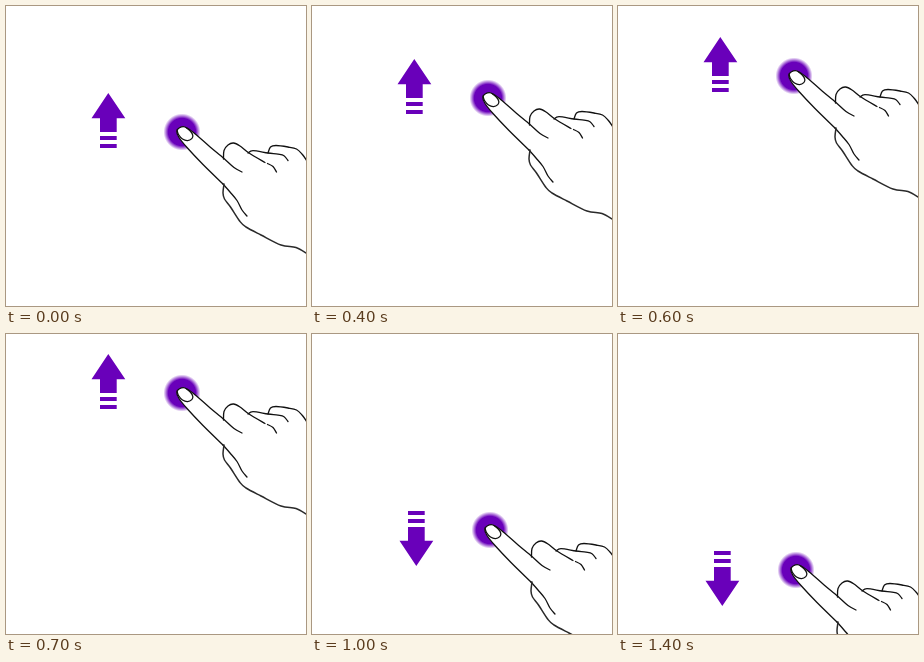
Recreate the animation shown at these times as an HTML page with a canvas. Size 300 by 300 pixels, loop 1.6 s.

```html
<!DOCTYPE html>
<html lang="en">
<head>
<meta charset="utf-8">
<title>Swipe up and down</title>
<style>
  html, body { margin: 0; width: 100%; height: 100%; overflow: hidden; background: #fff; }
  canvas { display: block; width: 300px; height: 300px; }
</style>
</head>
<body>
<canvas id="stage"></canvas>
<script>
const SIZE = 300, LOOP = 1600, STEP = 100;
const PURPLE = '#6900ba';
const canvas = document.getElementById('stage');
const ctx = canvas.getContext('2d');
const ratio = window.devicePixelRatio || 1;
canvas.width = canvas.height = SIZE * ratio;

// Smooth curve through every point (Catmull-Rom as Béziers).
function curve(...p) {
  const path = new Path2D();
  const at = i => p[Math.max(0, Math.min(p.length - 1, i))];
  path.moveTo(...p[0]);
  for (let i = 0; i < p.length - 1; i++) {
    const [a, b, c, d] = [at(i - 1), at(i), at(i + 1), at(i + 2)];
    path.bezierCurveTo(
      b[0] + (c[0] - a[0]) / 6, b[1] + (c[1] - a[1]) / 6,
      c[0] - (d[0] - b[0]) / 6, c[1] - (d[1] - b[1]) / 6, c[0], c[1]);
  }
  return path;
}

const finger = curve([217, 178], [197, 158.5], [181, 141.5], [173, 131.5], [170.8, 125.5],
  [173.5, 121.8], [179, 121], [187.5, 126.5], [203, 140], [218, 152.5], [228, 161.5], [236, 166]);
const nail = curve([171, 124], [172.5, 128.5], [176.5, 133], [181.5, 134.6], [185.8, 132.6],
  [186.8, 129.3], [184.5, 125.2], [180, 121.6]);
const lines = [
  curve([217, 178], [224, 186], [231, 194.5], [236, 204], [241, 210]),
  curve([217.5, 153], [218, 144.5], [222, 139], [227.5, 137], [234, 140], [243, 147], [259, 156.5]),
  curve([261.5, 157.5], [267, 160.5], [270.5, 166]),
  curve([242, 147], [247, 144.6], [262, 147], [272, 148.2], [278, 149.7], [282, 154.5]),
  curve([262, 147], [264.5, 141], [270, 139.5], [282, 141], [290.5, 143], [296, 148], [301, 155])
];
const palm = curve([218, 178], [217, 187], [218.5, 193], [224.5, 201], [234, 215.5], [240, 221],
  [255, 229], [275, 239], [290, 241.5], [301, 247.5]);

function drawArrow() {
  ctx.fillStyle = PURPLE;
  ctx.beginPath();
  [[102.3, 87], [119.3, 112.3], [110.7, 112.3], [110.7, 126], [94, 126], [94, 112.3], [85.5, 112.3]]
    .forEach(p => ctx.lineTo(...p));
  ctx.fill();
  ctx.fillRect(94, 130, 16.7, 4);
  ctx.fillRect(94, 138, 16.7, 4);
}

function drawHand() {
  const glow = ctx.createRadialGradient(176, 126, 0, 176, 126, 18.5);
  glow.addColorStop(0, PURPLE);
  glow.addColorStop(0.74, PURPLE);
  glow.addColorStop(0.87, 'rgba(105, 0, 186, 0.5)');
  glow.addColorStop(1, 'rgba(105, 0, 186, 0)');
  ctx.fillStyle = glow;
  ctx.fillRect(157, 107, 38, 38);

  ctx.fillStyle = '#fff';
  ctx.fill(finger);
  ctx.strokeStyle = '#111';
  ctx.lineCap = ctx.lineJoin = 'round';
  ctx.lineWidth = 1.3;
  [finger, nail, ...lines].forEach(path => ctx.stroke(path));
  ctx.strokeStyle = '#2a2a2a';
  ctx.lineWidth = 1.5;
  ctx.stroke(palm);
}

function draw(time) {
  const tick = Math.floor((time % LOOP) / STEP);
  const down = tick >= 8;
  const dx = down ? 2 : 0;
  const dy = down ? 50 + 10 * Math.min(tick - 8, 6) : -11.2 * Math.max(0, tick - 1);

  ctx.setTransform(ratio, 0, 0, ratio, 0, 0);
  ctx.fillStyle = '#fff';
  ctx.fillRect(0, 0, SIZE, SIZE);

  ctx.save();
  ctx.translate(dx, Math.round(dy));
  if (down) {
    // The lowered hand is cut off below the palm.
    ctx.beginPath();
    ctx.rect(0, 0, SIZE, 230);
    ctx.clip();
  }
  drawHand();
  ctx.restore();

  ctx.save();
  ctx.translate(dx, Math.round(dy));
  if (down) {
    ctx.translate(0, 249);
    ctx.scale(1, -1);
  }
  drawArrow();
  ctx.restore();
}

const start = performance.now();
function frame() {
  draw(performance.now() - start);
  requestAnimationFrame(frame);
}
frame();
</script>
</body>
</html>
```
